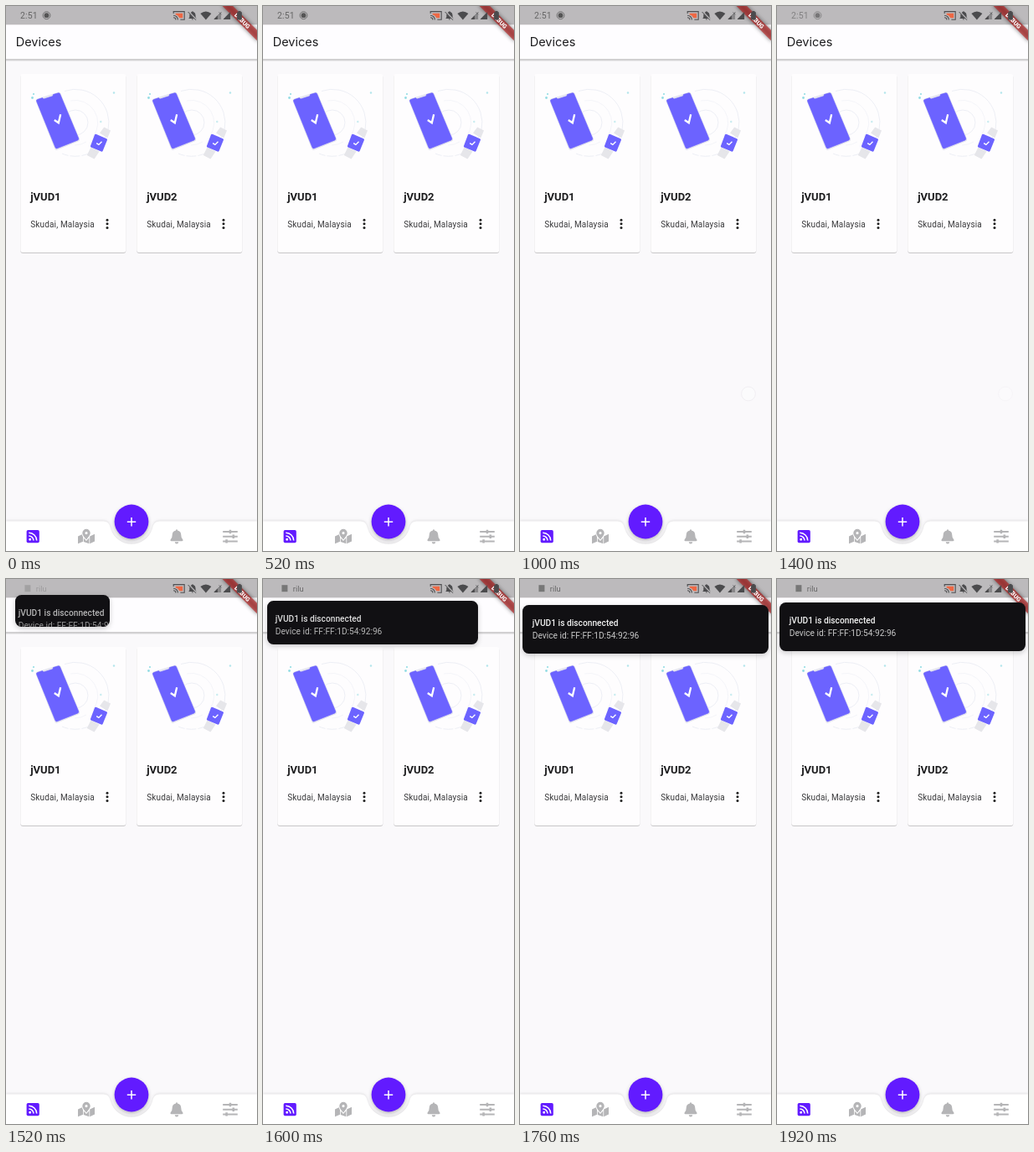
These frames come from a looping animation (300 by 650 pixels, 1960 ms). An HTML page:

```html
<!DOCTYPE html>
<html lang="en">
<head>
<meta charset="utf-8">
<title>Devices</title>
<style>
  html, body { margin: 0; width: 100%; height: 100%; overflow: hidden; background: #faf9fb; }
  #stage { position: relative; width: 300px; height: 650px; overflow: hidden; font-family: Roboto, sans-serif; }
  svg { position: absolute; left: 0; top: 0; display: block; }
  .shade { filter: drop-shadow(0 1px .5px rgba(0,0,0,.2)); }
  .name { font-size: 13px; font-weight: 700; fill: #1c1c1e; }
  .place { font-size: 10px; letter-spacing: .16px; fill: #3a3a3c; }
  .status { font-size: 10.4px; letter-spacing: .2px; fill: #666; }
  #toast { position: absolute; overflow: hidden; border-radius: 7.5px; background: #111013;
    box-shadow: 0 2px 6px rgba(0,0,0,.2); }
  #toast p { position: absolute; margin: 0; white-space: nowrap; font-size: 10.2px; line-height: 14px; }
  #head { top: 15px; color: #f2f2f2; font-weight: 500; }
  #info { top: 30.2px; color: #cacaca; }
</style>
</head>
<body>
<div id="stage">
<svg width="300" height="650" viewBox="0 0 300 650" font-family="Roboto, sans-serif">
  <defs>
    <linearGradient id="fall" x2="0" y2="1">
      <stop offset="0" stop-color="#000" stop-opacity=".3"/>
      <stop offset="1" stop-color="#000" stop-opacity="0"/>
    </linearGradient>
    <linearGradient id="bars">
      <stop offset=".45" stop-color="#4b4b4d"/>
      <stop offset=".55" stop-color="#4b4b4d" stop-opacity=".45"/>
    </linearGradient>
    <g id="card">
      <rect class="shade" x="17.3" y="81" width="126" height="213" rx="3" fill="#fefdfe"/>
      <g fill="none" stroke="#e6e8f1" stroke-width=".7">
        <path d="M70 101.5A40 40 0 0 1 122 148"/>
        <path d="M120 154A40 40 0 0 1 67 176" stroke-dasharray="12 2"/>
        <circle cx="83" cy="139" r="15"/>
        <path d="M77 113A27 27 0 0 1 104 156M96 162A27 27 0 0 1 82 166" stroke="#f0f1f6"/>
      </g>
      <g fill="#94dce4">
        <circle cx="33" cy="105" r="1.1"/><circle cx="31.5" cy="109.5" r="1.4"/>
        <circle cx="129" cy="103.5" r="1.2" opacity=".7"/><circle cx="113.3" cy="138" r="1.2" opacity=".5"/>
      </g>
      <path d="M37.5 110.5L62.5 102.8Q64.4 102.3 65.2 104L88 158.5Q88.6 160.5 87 161.3L61 171.8Q59.2 172.4 58.3 170.6L35.7 113.4Q35 111 37.5 110.5Z" fill="#e6e6ef"/>
      <path d="M37.5 111.6L43.5 109.6L45 111L56 107.6L56.4 105.6L62.5 103.8Q64 103.5 64.6 105L86.7 157.8Q87.2 159.4 85.8 160L61 169.8Q59.6 170.2 59 168.8L36.6 113.8Q36 112.1 37.5 111.6Z" fill="#6c63ff" stroke="#6c63ff" stroke-width=".7"/>
      <path d="M57.8 136L62.8 139.3L65.2 129.2" fill="none" stroke="#fff" stroke-width="2.3"/>
      <path d="M112 151.5L117.2 144.4L125 148.4L121.3 157.5ZM101.5 168.5L96.8 178L105.5 182.6L111.5 173.5Z" fill="#e6e6ea"/>
      <path d="M107.5 152.7L120.2 158.2Q121.4 158.9 120.9 160L115.7 172.8Q115 174.1 113.8 173.6L101.7 168.5Q100.6 167.9 101 166.7L106 153.5Q106.5 152.4 107.5 152.7Z" fill="#6c63ff"/>
      <path d="M108.2 163.6L110.9 165.4L114.5 161.8" fill="none" stroke="#fff" stroke-width="1.4"/>
      <text class="place" x="29.2" y="263.6">Skudai, Malaysia</text>
      <g fill="#222">
        <circle cx="121" cy="255.2" r="1.5"/><circle cx="121" cy="259.8" r="1.5"/><circle cx="121" cy="264.4" r="1.5"/>
      </g>
    </g>
  </defs>

  <rect width="300" height="650" fill="#faf9fb"/>
  <rect y="63" width="300" height="3.2" fill="url(#fall)"/>
  <rect y="22" width="300" height="41.3" fill="#fefdff"/>
  <text x="11.7" y="48.2" font-family="Inter, sans-serif" font-size="14.5" font-weight="400" fill="#1d1d1f">Devices</text>
  <rect width="300" height="22.3" fill="#bcbabc"/>

  <use href="#card"/>
  <use href="#card" x="139"/>
  <text class="name" x="29.2" y="232.2">jVUD1</text>
  <text class="name" x="168.2" y="232.2">jVUD2</text>

  <circle id="touch" cx="273" cy="462.5" r="8.4" fill="#fff" fill-opacity=".3" stroke="#f1eff3"/>

  <path d="M0 614.5H114C122 614.5 123.5 617 125 623A26 26 0 0 0 175 623C176.5 617 178 614.5 186 614.5H300V650H0Z"
    fill="#fff" style="filter:drop-shadow(0 -.5px 1.6px rgba(0,0,0,.1))"/>
  <circle cx="150" cy="615" r="20.4" fill="#621bff" style="filter:drop-shadow(0 2px 2px rgba(0,0,0,.25))"/>
  <path d="M144.8 615.2H155.2M150 610V620.4" stroke="#fff" stroke-width="1.5"/>

  <rect x="24.6" y="625" width="15.2" height="15.2" rx="1.8" fill="#621bff"/>
  <g fill="none" stroke="#fff" stroke-width="1.5">
    <path d="M27.3 628.2A9.4 9.4 0 0 1 36.7 637.6M27.3 632A5.6 5.6 0 0 1 32.9 637.6"/>
    <circle cx="28.7" cy="636.2" r=".7"/>
  </g>
  <g fill="#b5b5b7">
    <path d="M86 632.4L90.7 630.3Q91.3 632 92 633.2V638.8L86 641.2ZM92.8 634.6L96 638L99.4 634.2V641.2L92.8 638.9ZM100.2 632.6L106 629.8V638.6L100.2 641.2Z"/>
    <path fill-rule="evenodd" d="M96 636.6C92 631.5 91.3 630.3 91.3 628.5A4.7 4.7 0 0 1 100.7 628.5C100.7 630.3 100 631.5 96 636.6ZM96 627A1.6 1.6 0 1 0 96 630.2A1.6 1.6 0 1 0 96 627Z"/>
    <path d="M203 625.4Q203 624.2 204 624.2T205 625.4Q209.3 626.3 209.3 631Q209.3 634.8 211.3 636.3Q212.2 638.3 210.4 638.3H197.6Q195.8 638.3 196.7 636.3Q198.7 634.8 198.7 631Q198.7 626.3 203 625.4ZM201.7 639.2H206.3Q205.9 641.4 204 641.4T201.7 639.2Z"/>
  </g>
  <path d="M259.2 627H276.8M259.2 632.7H276.8M259.2 638.4H276.8" stroke="#b5b5b7" stroke-width="2"/>
  <path d="M268 624.8V629.2M271.8 630.5V634.9M263.6 636.2V640.6" stroke="#b5b5b7" stroke-width="2.6"/>

  <g transform="translate(300 0) rotate(45)">
    <rect x="-30" y="20.4" width="60" height="8.8" fill-opacity=".5" style="filter:blur(2.6px)"/>
    <rect x="-30" y="20.4" width="60" height="8.8" fill="#b71c1c" fill-opacity=".63"/>
    <text y="27.4" text-anchor="middle" font-size="7.2" font-weight="900" fill="#fff">DEBUG</text>
  </g>

  <g id="clock">
    <text class="status" x="17" y="15">2:51</text>
    <circle cx="48.5" cy="11.2" r="4.4" fill="none" stroke="#666" stroke-width=".9"/>
    <circle cx="48.5" cy="11.2" r="2.9" fill="#555"/>
  </g>
  <g id="app">
    <rect x="22.4" y="7.2" width="7" height="8" fill="#777"/>
    <text x="35.8" y="14.6" font-size="9.4" fill="#686868">rilu</text>
  </g>

  <g transform="translate(-.4 0)">
    <path d="M203 8.7H211.6V14.3H207.8Q206 10.7 203 10.2Z" fill="#ee6844"/>
    <path d="M200.6 9V6.6H213.6V16.3H208.8M200.5 11.2A5.3 5.3 0 0 1 205.8 16.5M200.5 13.7A2.8 2.8 0 0 1 203.3 16.5"
      fill="none" stroke="#4f4f51" stroke-width="1.1"/>
    <g fill="#4b4b4d">
      <path d="M222.3 7Q223.4 5.6 224.4 7Q227 8 227 11V13.6L228 15H218.6L219.7 13.6V11Q219.7 8 222.3 7ZM222 15.6H224.6Q223.3 17.6 222 15.6Z"/>
      <path d="M232.8 9Q239.3 3.9 245.8 9L239.3 16.6Z"/>
      <path d="M249 16V15.4L257.5 7V16Z" fill="url(#bars)"/>
      <path d="M260.3 16V15.4L268.6 7V16Z"/>
      <path d="M276.5 7.2H278V6H281V7.2H282.3V16.4H276.5Z"/>
    </g>
    <path d="M218.5 6.4L228 16.4" stroke="#bcbabc" stroke-width="1.6"/>
    <path d="M218 7L227.4 16.8" stroke="#4b4b4d"/>
    <path d="M254.8 7.2L258 10.4M258 7.2L254.8 10.4" stroke="#5f5f61" stroke-width=".7"/>
  </g>
</svg>
<div id="toast"><p id="head">jVUD1 is disconnected</p><p id="info">Device id: FF:FF:1D:54:92:96</p></div>
</div>
<script>
const LOOP = 1960, STEP = 40;
const [touch, clock, app, toast, head, info] =
  ['touch', 'clock', 'app', 'toast', 'head', 'info'].map(id => document.getElementById(id));

// time, left, top, right, bottom, box opacity, text opacity
const slide = [
  [1400, 14, 4, 30, 16, 0, 0],
  [1440, 13, 8, 46, 28, .4, .1],
  [1480, 12, 13, 78, 42, .8, .4],
  [1520, 10.8, 18.5, 124, 56.6, 1, .72],
  [1560, 7.6, 22.6, 198, 68.5, 1, .82],
  [1600, 5, 26, 256.5, 78.2, 1, .9],
  [1640, 3.8, 28.4, 281, 83.6, 1, .96],
  [1680, 3.2, 30, 293, 87, 1, 1],
  [1760, 3, 30.6, 297, 88.6, 1, 1],
  [1840, 3, 29.2, 297, 87.2, 1, 1],
  [1920, 3, 28, 297, 86, 1, 1]
];
const clamp = v => Math.max(0, Math.min(1, v));
const ramp = (t, a, b) => clamp((t - a) / (b - a));

function sample(rows, t) {
  const i = rows.findIndex(r => r[0] >= t);
  if (i < 1) return rows[i < 0 ? rows.length - 1 : 0];
  const a = rows[i - 1], b = rows[i], k = (t - a[0]) / (b[0] - a[0]);
  return a.map((v, n) => v + (b[n] - v) * k);
}

function draw(now) {
  const t = Math.floor((now % LOOP) / STEP) * STEP;
  const [, l, top, r, b, box, text] = sample(slide, t);
  Object.assign(toast.style, {
    left: l + 'px', top: top + 'px', width: r - l + 'px', height: b - top + 'px', opacity: box
  });
  for (const p of [head, info]) {
    p.style.left = 14.8 - l + 'px';
    p.style.opacity = text;
  }
  touch.style.opacity = ramp(t, 720, 840) * (1 - ramp(t, 1360, 1440));
  clock.style.opacity = 1 - ramp(t, 1360, 1480);
  app.style.opacity = ramp(t, 1480, 1590);
}

const start = performance.now();
function tick(now) {
  draw(Math.max(0, now - start));
  requestAnimationFrame(tick);
}
draw(0);
requestAnimationFrame(tick);
</script>
</body>
</html>
```
